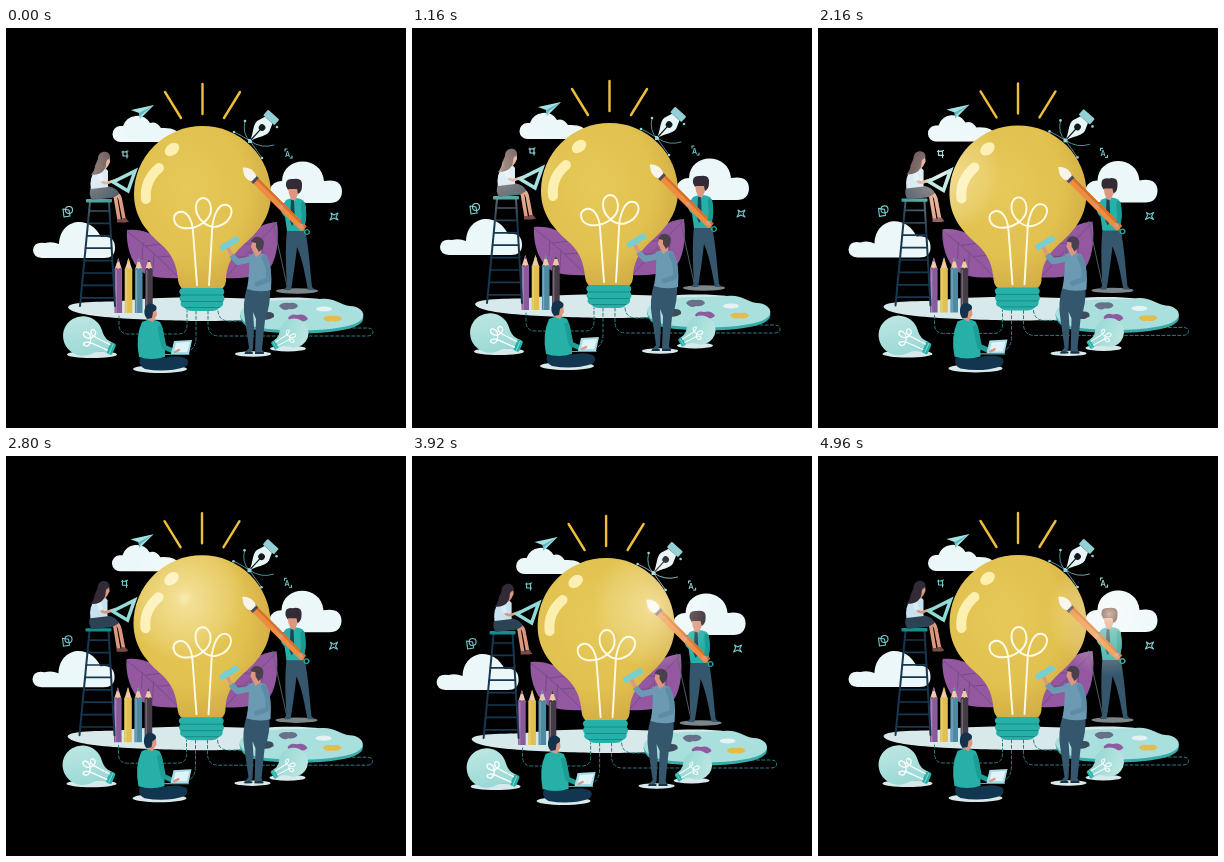
An HTML page that plays this animation: 400x400 px, repeating every 5000 ms.

```html
<!DOCTYPE html>
<html lang="en">
<head>
<meta charset="utf-8">
<title>Big idea</title>
<style>
html, body { margin: 0; width: 100%; height: 100%; overflow: hidden; background: #000; }
svg { display: block; width: 100vw; height: 100vh; }
.line { fill: none; stroke-linecap: round; stroke-linejoin: round; }
.cloud { fill: #ebf7f9; }
.skin { fill: #dd977e; }
.arm { stroke: #dd977e; }
.navy { fill: #34576d; }
.hair { fill: #322b36; }
.teal { fill: #27b0a8; }
.pad { fill: #d8e9ec; }
#lit { mix-blend-mode: screen; }
</style>
</head>
<body>
<svg viewBox="0 0 400 400">
<defs>
  <radialGradient id="gold" cx=".4" cy=".38" r=".7">
    <stop offset="0" stop-color="#e6c95a"/>
    <stop offset=".6" stop-color="#e1c14f"/>
    <stop offset="1" stop-color="#cfa743"/>
  </radialGradient>
  <radialGradient id="shine">
    <stop offset="0" stop-color="#fff" stop-opacity=".8"/>
    <stop offset=".14" stop-color="#fff" stop-opacity=".52"/>
    <stop offset=".45" stop-color="#fff" stop-opacity=".34"/>
    <stop offset=".72" stop-color="#fff" stop-opacity=".2"/>
    <stop offset="1" stop-color="#fff" stop-opacity="0"/>
  </radialGradient>
  <linearGradient id="glass" x2="1" y2="1">
    <stop offset="0" stop-color="#c3e9e5"/>
    <stop offset="1" stop-color="#8dd4d0"/>
  </linearGradient>
  <!-- flat warm copy of the artwork, shown only where the light falls -->
  <filter id="warm" filterUnits="userSpaceOnUse" width="400" height="400" color-interpolation-filters="sRGB">
    <feColorMatrix values="0 0 0 0 1  0 0 0 0 .83  0 0 0 0 .7  0 0 0 1 0"/>
  </filter>
  <mask id="spot" maskUnits="userSpaceOnUse" width="400" height="400">
    <circle id="glow" r="62" fill="url(#shine)"/>
  </mask>
  <g id="mini">
    <path fill="url(#glass)" d="M-20 0A20 20 0 0 1 15 -13C20 -7 24 -6 30 -6V6C24 6 20 7 15 13A20 20 0 0 1 -20 0Z"/>
    <rect class="teal" x="28" y="-6" width="6" height="12" rx="2"/>
    <path class="line" stroke="#7fd8d2" stroke-width="1" d="M31 -5V5"/>
    <path class="line" stroke="#fff" stroke-width="1.300" d="M28 -3L12 -4C4 -4 4 -11 8 -10C13 -9 10 0 4 0C-2 0 -2 -6 3 -5C9 -4 12 8 6 8C1 8 4 3 12 3H28"/>
  </g>
</defs>

<g id="scene">
<g id="art">
  <g class="cloud">
    <path d="M115 114A8 8 0 0 1 114 98Q116 98 117 98A15 15 0 0 1 144 95Q150 93 155 100Q172 99 173 108Q172 114 164 114Z"/>
    <path d="M270 175Q261 170 264 161Q267 153 276 153C277 127 316 127 318 153Q336 150 336 164Q335 175 324 175Z"/>
    <path d="M36 230Q27 229 27 222Q28 213 39 215Q46 213 53 216C54 190 84 186 95 209Q109 207 109 220Q109 230 98 230Z"/>
  </g>

  <path class="line" stroke="#efbf3c" stroke-width="2.400" d="M159 64L175 90M196.500 56V86M234 64L218 90"/>

  <!-- paper plane and floating icons -->
  <path fill="#a6e2e4" d="M125 82L148 77L134 91L133 85Z"/>
  <path fill="#5fb9c0" d="M133 85L148 77L135 87L134 91Z"/>
  <g class="line" stroke="#72c9cc" stroke-width="1.100">
    <path d="M117 123V128H122M116 124H121V130M119 124L122 123"/>
    <circle cx="63" cy="182" r="3.500"/>
    <path d="M57 181L63 182L64 188L58 189Z"/>
    <path d="M325 185L328 187L332 185L330 189L332 192L328 190L324 192L326 188Z"/>
    <path d="M279 123V121H281M284 130H286V128"/>
  </g>
  <text x="279" y="129" font-family="Inter, sans-serif" font-size="7" font-weight="600" fill="#72c9cc">A</text>

  <!-- platform -->
  <path class="pad" d="M62 279C66 272 100 275 125 272C165 268 225 270 255 271C285 268 328 270 330 276C326 292 240 293 190 293C140 292 64 290 62 279Z"/>
  <path class="line" stroke="#2f7a85" stroke-dasharray="3 2.300" stroke-width="1" d="M113 288V298Q114 306 122 306H172Q181 306 181 297V283M190 283V309Q190 318 185 322M202 283V298Q203 308 213 308H361Q367 308 367 304Q367 300 361 300H300M212 283Q213 293 223 293H240"/>

  <!-- leaves -->
  <path fill="#93589f" d="M121 202C143 199 170 214 174 250C153 251 142 248 136 244C124 234 120 216 121 202Z"/>
  <path fill="#93589f" d="M271 194C250 195 222 215 219 250C241 251 256 248 264 240C272 228 273 208 271 194Z"/>
  <path class="line" stroke="#6d4a80" stroke-width=".8" d="M122 204Q148 224 172 249M137 215L136 231M148 225L147 243M140 218L155 216M152 229L166 228M270 196Q246 220 220 249M256 212L257 229M245 224L245 242M252 216L239 216M240 229L226 229"/>

  <!-- large bulb -->
  <path fill="url(#gold)" d="M128 166A68.500 68 0 0 1 265 166C265 191 250 206 237 217C225 228 220 239 220 253Q219 262 211 262H182Q173 262 172 252C171 238 167 228 157 218C143 206 128 191 128 166Z"/>
  <path class="line" stroke="#fcefb0" stroke-width="10" d="M153 140Q138 153 140 171"/>
  <ellipse fill="#fcefb0" cx="166" cy="121.500" rx="8" ry="5.800" transform="rotate(-38 166 121.500)"/>
  <path class="line" stroke="#fffbe8" stroke-width="1.900" d="M191 257L187 203C186 190 180 182 173 184C165 187 167 198 177 200C191 202 206 192 205 180C204 167 191 167 190 178C189 190 202 202 213 198C225 194 230 180 221 177C210 174 206 195 206 204L203 257"/>
  <path class="teal" d="M176 260H216Q220 263 217 267Q220 270 217 274Q218 278 213 280Q211 283 205 283H187Q180 283 179 280Q173 278 175 274Q172 270 175 267Q171 263 176 260Z"/>
  <path class="line" stroke="#178a86" stroke-width="1" d="M176 267H216M176 273.500H216M179 279.500H213"/>

  <!-- pen nib with curve handles -->
  <path class="line" stroke="#5b9fa8" stroke-width=".9" d="M239 93Q236 106 244 113Q256 121 268 117M228 104Q235 107 244 113L256 130"/>
  <g fill="#8fd3d6">
    <circle cx="239" cy="93" r="1.300"/><circle cx="228" cy="104" r="1.300"/>
    <circle cx="271" cy="99" r="1.300"/><circle cx="256" cy="130" r="1.300"/>
    <rect x="242" y="111" width="4" height="4"/>
  </g>
  <g transform="translate(244 113) rotate(42)">
    <path fill="#e6f5f6" d="M0 0C-3 -9 -9 -14 -8 -20L-5 -28H5L8 -20C9 -14 3 -9 0 0Z"/>
    <path class="line" stroke="#101820" stroke-width="1.200" d="M0 -2V-15"/>
    <circle cx="0" cy="-18" r="3.300" fill="#101820"/>
    <rect x="-7.500" y="-35.500" width="15" height="7.500" rx="1" fill="#93d0d5"/>
  </g>

  <g id="pencils"></g>

  <!-- ladder and seated woman -->
  <path class="line" stroke="#17384f" stroke-width="2" d="M84 174L74 278M103 174L109 278"/>
  <path id="rungs" class="line" stroke="#17384f" stroke-width="1.700"/>
  <rect x="80" y="171" width="26" height="3.400" rx="1" fill="#178e8d"/>
  <path class="line arm" stroke-width="3.600" d="M104 166Q110 166 110 173L113 191M108 164Q114 166 115 175L118 191"/>
  <path fill="#7a4b48" d="M111 191L115 191L121 194.500H111ZM116 190L120 190L123 194H117Z"/>
  <path fill="#2c4356" d="M85 159L101 158Q112 160 113 166Q108 170 104 170L86 172Q82 166 85 159Z"/>
  <path fill="#c8e3ef" d="M90 141Q98 137 102 143L102 159L85 161Q83 150 90 141Z"/>
  <path class="line arm" stroke-width="2.800" d="M94 148Q95 156 101 155L110 152"/>
  <path class="line" stroke="#d9edf5" stroke-width="5" d="M93 145L95 151"/>
  <path class="skin" d="M97 128H103.500L104 134L102 138L99 142L96 139Z"/>
  <path class="hair" d="M92 131C92 122 103 122 104 128L103 131Q100 131 100 137C99 144 93 147 85 147Q89 142 89 138Z"/>
  <path class="line" stroke="#8fdbd8" stroke-width="3.500" style="stroke-linejoin:miter" d="M107 154L129 143L122 163Z"/>

  <!-- palette -->
  <path fill="#39aca9" d="M234 288C235 269 300 276 316 274C328 271 334 279 344 280C352 280 359 285 357 292C352 308 270 308 246 301Q235 297 234 288Z"/>
  <path fill="#a9dfdc" d="M234 286C235 268 300 273 314 271C328 269 334 277 344 278C353 278 359 284 357 289C352 305 270 305 246 298Q235 294 234 286Z"/>
  <path fill="#3e4b5a" d="M253 287Q256 282 262 284Q269 284 268 289Q262 293 256 291Z"/>
  <path fill="#69718a" d="M273 278Q276 274 283 275Q290 274 292 278Q289 282 283 281Q278 284 273 278Z"/>
  <path fill="#8e5ba0" d="M282 290Q285 285 291 287Q299 285 302 291Q298 295 291 293Q285 296 282 290Z"/>
  <path fill="#e1bd4b" d="M317 290Q321 287 327 288Q335 287 336 291Q331 295 326 293Q320 295 317 290Z"/>
  <ellipse cx="318" cy="281" rx="8" ry="2.600" fill="#e6f3f4"/>

  <!-- man with brush -->
  <ellipse cx="291" cy="263" rx="21" ry="2.700" fill="#7c8588"/>
  <path class="line" stroke="#57686e" stroke-width=".9" d="M267 194L282 262"/>
  <path class="navy" d="M281 201H299C303 222 304 240 306 259L309 262H302C299 247 297 233 291 219C289 236 287 250 285 262H278L281 258C280 240 279 222 281 201Z"/>
  <path class="teal" d="M280 172Q289 168 297 172Q301 176 300 191L298 203H281L279 189Q275 186 275 180Z"/>
  <path fill="#1b4659" d="M285 172H288L289 194L286 198L284 193Z"/>
  <path class="skin" d="M282 159H292V166L289 173L285 171L283 166Z"/>
  <path class="hair" d="M280 158Q279 150 287 151Q297 149 296 158Q296 164 292 166L291 161L283 161L282 162Z"/>
  <g transform="translate(243 146) rotate(-45)">
    <rect x="-3.600" y="7" width="7.200" height="71" rx="2" fill="#ef8c40"/>
    <rect x="1.200" y="7" width="2.400" height="71" fill="#d3722f"/>
    <rect x="-4" y="5" width="8" height="5" fill="#4a4c58"/>
    <path fill="#f7f4ec" d="M0 -9Q5 -5 5 1Q5 5 3.500 7H-3.500Q-6 2 -4 -3Z"/>
    <circle cx="0" cy="82" r="2.300" fill="none" stroke="#26a79f" stroke-width="1.300"/>
  </g>
  <circle class="skin" cx="275" cy="179" r="2.200"/>
  <circle class="skin" cx="295" cy="198" r="2.400"/>
  <path class="line" stroke="#1b9993" stroke-width="4.500" d="M297 176L298 188L297 194"/>

  <!-- small bulbs -->
  <ellipse class="pad" cx="86" cy="326.500" rx="25" ry="3.600"/>
  <use href="#mini" transform="translate(77 308) rotate(24)"/>
  <ellipse class="pad" cx="282" cy="320.500" rx="18" ry="3"/>
  <use href="#mini" transform="translate(288 305) rotate(148) scale(.73)"/>

  <!-- standing man -->
  <ellipse class="pad" cx="247" cy="326" rx="18" ry="2.700"/>
  <path class="navy" d="M241 259H264Q265 276 259 292L256 321L258 326H249L250 291L247 284L248 299L247 321L244 326H238L243 320L239 292Q236 276 241 259Z"/>
  <path class="line" stroke="#1a3346" stroke-width="2" d="M240 325H246M250 325H257"/>
  <path fill="#6d9ab3" d="M243 227Q252 223 260 227Q267 239 265 262Q253 265 241 261Q244 244 243 227Z"/>
  <path class="line" stroke="#6d9ab3" stroke-width="6" d="M246 231L232 234L227 229"/>
  <path class="line" stroke="#5d8ca6" stroke-width="5" d="M258 230Q264 240 262 252L251 256"/>
  <path class="line arm" stroke-width="3.500" d="M225 226L222 220"/>
  <path class="skin" d="M246 214H255V225L250 229L247 223L245 219Z"/>
  <path fill="#4a3f4c" d="M245 214Q247 208 253 209Q260 211 257 220L253 224L250 219L250 215Z"/>
  <rect x="-10.500" y="-3" width="21" height="6" rx="1" fill="#78cfd1" transform="translate(223.500 215.500) rotate(-31)"/>

  <!-- man with laptop -->
  <ellipse class="pad" cx="154" cy="341" rx="27" ry="4"/>
  <path fill="#12364f" d="M134 330H157Q173 326 181 331Q184 335 179 339Q160 345 139 341Q132 338 134 330Z"/>
  <path class="teal" d="M136 294Q145 289 154 294Q159 302 159 329Q145 333 133 329Q129 309 136 294Z"/>
  <path class="line" stroke="#1c9d96" stroke-width="5" d="M154 300L158 319L167 323"/>
  <path class="line arm" stroke-width="3" d="M167 323L173 324"/>
  <path class="skin" d="M142 280H150L151 287L147 294L142 292Z"/>
  <path fill="#14324b" d="M139 280Q141 274 147 276Q152 278 150 282L147 284L146 290L141 291Q137 286 139 280Z"/>
  <path fill="#a7dce6" d="M168 313L186 312L183 326H165Z"/>
  <path fill="#e0f4f8" d="M170 315L184 314L181 324H168Z"/>
  <path class="line" stroke="#5c9eae" stroke-width="1.200" d="M158 326.500H183"/>
  <path class="line arm" stroke-width="2.500" d="M169 324L173 322"/>
</g>
<g id="lit" mask="url(#spot)"><use href="#art" filter="url(#warm)"/></g>
</g>
</svg>
<script>
const $ = id => document.getElementById(id);

$('pencils').innerHTML = ['#8b5a9b', '#dfc050', '#4f8aa3', '#463c49'].map((c, i) => {
  const x = 108.5 + i * 10.2;
  return `<path fill="#efc9a8" d="M${x} 242l3.800 -12l3.800 12z"/>
    <path fill="${c}" d="M${x + 2.5} 234l1.300 -4l1.300 4zM${x} 241q2 -2 3.800 0q2 -2 3.800 0v44h-7.600z"/>
    <path fill="#fff" opacity=".25" d="M${x + 1} 242h1.300v43h-1.300z"/>`;
}).join('');

let rungs = '';
for (let i = 0; i < 8; i++) {
  const y = 183 + i * 12.4, k = (y - 174) / 104;
  rungs += `M${84 - 10 * k} ${y}H${103 + 6 * k}`;
}
$('rungs').setAttribute('d', rungs);

// [time, x, y]
const drift = [
  [0, 0, 0], [280, -1.4, .3], [600, -2.2, -.8], [900, -1, -4], [1160, 1, -3],
  [1680, 3.2, -1.7], [2160, 3.5, -.6], [2800, -.5, 1.2], [3360, -3.7, 2.6],
  [3920, -2.4, 4], [4480, 1.6, 6], [4960, 3.5, 1]
];
const light = [
  [0, 74, 138], [1160, 84, 140], [2160, 119, 147],
  [2800, 179, 141], [3920, 244, 147], [4960, 288, 157]
];

// Smooth curve through the keys (cubic Hermite)
function at(keys, t) {
  const last = keys.length - 1;
  let i = 0;
  while (i < last - 1 && t > keys[i + 1][0]) i++;
  const a = keys[i], b = keys[i + 1], span = b[0] - a[0];
  const u = Math.min(1, (t - a[0]) / span);
  const slope = (j, c) => {
    const p = keys[Math.max(0, j - 1)], n = keys[Math.min(last, j + 1)];
    return (n[c] - p[c]) / (n[0] - p[0]) * span;
  };
  return [1, 2].map(c =>
    a[c] + u * u * (3 - 2 * u) * (b[c] - a[c]) +
    u * (1 - u) * ((1 - u) * slope(i, c) - u * slope(i + 1, c)));
}

function draw(now) {
  const t = Math.floor(now % 5000 / 40) * 40;
  $('scene').setAttribute('transform', `translate(${at(drift, t)})`);
  $('glow').setAttribute('transform', `translate(${at(light, t)})`);
  requestAnimationFrame(draw);
}
draw(0);
</script>
</body>
</html>
```
